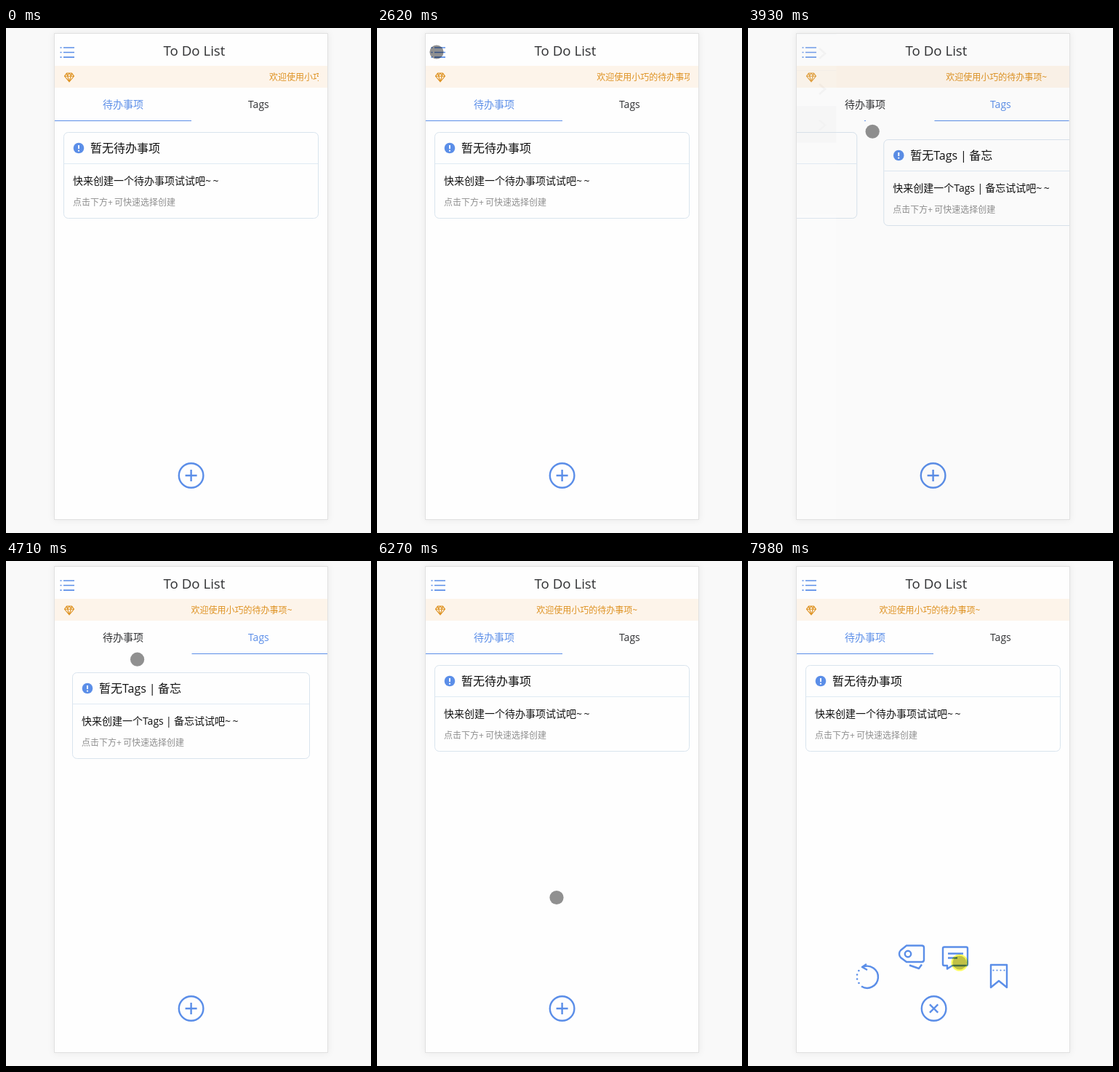
These frames come from a looping animation (502x694 px, 8000 ms). An HTML page:

```html
<!DOCTYPE html>
<html lang="zh">
<head>
<meta charset="utf-8">
<title>To Do List</title>
<style>
html, body { margin: 0; width: 100%; height: 100%; overflow: hidden; background: #f9f9f9; }
svg { display: block; width: 502px; height: 694px; }
text { font-family: "Open Sans", "Noto Sans CJK SC", "Noto Sans CJK", sans-serif; fill: #303133; white-space: pre; }
.line { fill: none; stroke: #5b8ee8; stroke-width: 2.4; stroke-linejoin: round; }
.dots { fill: none; stroke: #5b8ee8; stroke-linecap: round; }
.chev { fill: none; stroke: #c6c6c6; stroke-width: 2.6; }
</style>
</head>
<body>
<svg id="stage" viewBox="0 0 502 694"></svg>
<script>
const LOOP = 8000, STEP = 77.5, PHASE = 54;
const BLUE = '#5b8ee8', INK = '#303133';

// Symbols get the wider or narrower spacing of the CJK face.
const text = (x, y, size, s, fill = INK, id = '') =>
  `<text x="${x}" y="${y}" font-size="${size}" style="fill:${fill}" ${id && `id="${id}"`}>` +
  s.replace(/[~+]+/g, '<tspan letter-spacing=".18em">$&</tspan>')
   .replace(' | ', '<tspan letter-spacing="-.02em"> | </tspan>') + '</text>';

const card = (x, y, w, title, line) => `<g transform="translate(${x} ${y})">
  <rect x=".5" y=".5" width="${w - 1}" height="118" rx="6" fill="#fefefe" stroke="#d9e4ee"/>
  <path d="M1 43.5H${w - 1}" stroke="#dfeaf4"/>
  <circle cx="21" cy="22" r="7.3" fill="${BLUE}"/>
  <path d="M21 18V23" stroke="#fff" stroke-width="2"/><circle cx="21" cy="25.7" r="1.1" fill="#fff"/>
  ${text(37, 28, 16, title, '#111')}
  ${text(13, 72, 14, line, '#111')}
  ${text(13, 101, 12, '点击下方+可快速选择创建', '#909090')}</g>`;

const chevron = y => `<path class="chev" d="M273.5 ${y - 7}l8 7l-8 7"/>`;

// Menu buttons, drawn around their own centres, right to left.
const buttons = [
  { x: 345, y: 571, art: `<path class="line" d="M-11-16H11V15L0 6L-11 15Z"/>
      <path class="dots" stroke-width="2.2" stroke-dasharray="0 5" d="M-7.5-8.5H8"/>` },
  { x: 285, y: 545, art: `<path class="line" d="M-15-14.5H15Q17-14.5 17-12.5V9Q17 11 15 11H-4L-11 15.5V11H-15Q-17 11-17 9V-12.5Q-17-14.5-15-14.5Z"/>
      <path class="line" d="M-10-5.5H11M-10 .5H3"/>` },
  { x: 225, y: 544, art: `<path class="line" d="M-7-15.5H14Q17-15.5 17-12.5V4Q17 7 14 7H-7L-15 1Q-17-1-17-4Q-17-7-15-9Z"/>
      <circle class="line" cx="-5" cy="-4" r="4.2"/><path class="line" d="M-3 11.5L10 16L14 10.5"/>` },
  { x: 165, y: 571, art: `<path class="line" d="M-7-13A15 15 0 1 1-9 13.5"/>
      <path class="line" d="M-2-17L-8-13L-1-9"/>
      <path class="dots" stroke-width="2.6" stroke-dasharray="0 6" d="M-12.5 9A15 15 0 0 1-10-11"/>` }
];

const stage = document.getElementById('stage');
stage.innerHTML = `
<clipPath id="phone"><rect x="67" y="8" width="375" height="667"/></clipPath>
<clipPath id="strip"><rect x="104" y="52" width="326" height="30"/></clipPath>
<rect width="502" height="694" fill="#f9f9f9"/>
<rect x="66.5" y="7.5" width="376" height="668" fill="#fefefe" stroke="#e1e1e1"
  style="filter:drop-shadow(0 0 5px rgba(0,0,0,.07))"/>
<g clip-path="url(#phone)">
  <path d="M79 27H94M79 33.5H94M79 40.2H94" stroke="${BLUE}" stroke-width="1.7"/>
  <path d="M74.5 27H76.5M74.5 33.5H76.5M74.5 40.2H76.5" stroke="${BLUE}" stroke-width="1.7"/>
  ${text(216.5, 38, 18.7, 'To Do List')}
  <rect x="67" y="52" width="375" height="30" fill="#fdf4ea"/>
  <path d="M83.5 62H90.5L93.5 66.2L87 74L80.5 66.2ZM80.5 66.2H93.5M83.5 62L87 74L90.5 62M84.3 66L87 62L89.7 66"
    fill="none" stroke="#de9222" stroke-width="1.15" stroke-linejoin="round"/>
  <g clip-path="url(#strip)">${text(0, 72, 12, '欢迎使用小巧的待办事项~', '#de9222', 'news')}</g>
  ${text(133, 110, 14, '待办事项', BLUE, 'tab0')}
  ${text(333, 110, 14, 'Tags', INK, 'tab1')}
  <rect id="bar0" y="127" height="1" fill="${BLUE}"/>
  <rect id="bar1" y="127" height="1" fill="${BLUE}"/>
  <g id="pages">
    ${card(79, 143, 351, '暂无待办事项', '快来创建一个待办事项试试吧~~')}
    ${card(466, 153, 327, '暂无Tags | 备忘', '快来创建一个Tags | 备忘试试吧~~')}
  </g>
  ${buttons.map((b, i) => `<g id="btn${i}">${b.art}</g>`).join('')}
  <g id="add"><circle class="line" r="16.8"/><path class="line" d="M-8 0H8M0-8V8"/></g>
  <rect id="shade" x="67" y="8" width="375" height="667"/>
  <g id="drawer">
    <rect x="67" y="8" width="230" height="667" fill="#fff"/>
    <rect id="hover" x="67" y="108" width="230" height="49" fill="#e2e2e2"/>
    <path d="M67 8.5H297M79 58.5H297" stroke="#dbe8f2"/>
    <path d="M67 107.5H297M67 157.5H297" stroke="#e8ebee"/>
    ${chevron(35)}${chevron(84)}${chevron(133.5)}
    ${text(79, 90, 16, '全部待...')}
    ${text(79, 139, 16, '全部Tags')}
  </g>
</g>
<g id="cursor">
  <circle id="glow" r="11.5" fill="#ffff5c" style="mix-blend-mode:multiply"/>
  <circle id="dot" r="9.6"/>
</g>`;

const el = {};
stage.querySelectorAll('[id]').forEach(n => el[n.id] = n);
const set = (id, attrs) => { for (const k in attrs) el[id].setAttribute(k, attrs[k]); };

const span = (t, start, dur) => Math.min(1, Math.max(0, (t - start) / dur));
const sine = p => (1 - Math.cos(Math.PI * p)) / 2;
const out = p => 1 - (1 - p) ** 3;
const back = p => 1 + 2.7 * (p - 1) ** 3 + 1.7 * (p - 1) ** 2;

// Pointer stops: time, x, y
const path = [
  [905, 372, 653], [1000, 293, 445], [1150, 292, 337], [1300, 310, 290], [1480, 278, 262],
  [1690, 176, 125], [1850, 160, 110], [2420, 82, 33], [2700, 82, 33], [3165, 146, 147],
  [3640, 146, 146], [3930, 171, 142], [4220, 181, 157], [4500, 181, 155], [5020, 180, 106],
  [5500, 180, 106], [5940, 192, 130], [6120, 262, 357], [6220, 247, 430], [6300, 247, 495],
  [6400, 256, 624], [6600, 256, 624], [7045, 258, 622], [7200, 260, 618], [7600, 291, 552], [8000, 291, 552]
];
const clicks = [[2480, 2600], [3500, 3640], [5090, 5220], [6390, 6520], [7850, 8000]];

function pointer(t) {
  let i = 1;
  while (i < path.length - 1 && path[i][0] < t) i++;
  const [a, b] = [path[i - 1], path[i]], p = span(t, a[0], b[0] - a[0]);
  return [a[1] + (b[1] - a[1]) * p, a[2] + (b[2] - a[2]) * p];
}

function bar(id, mid, w) {
  set(id, { x: mid - w / 2, width: w });
}

function draw(t) {
  set('news', { x: 362 - t * 0.0228 });

  // Tabs and swiped pages
  const tags = out(span(t, 3700, 300)) - out(span(t, 5309, 300));
  const onTags = t >= 3700 && t < 5309;
  el.tab0.style.fill = onTags ? INK : BLUE;
  el.tab1.style.fill = onTags ? BLUE : INK;
  bar('bar0', 161, 188 * (1 - tags));
  bar('bar1', 349, 187 * tags);
  const swipe = sine(span(t, 3560, 565)) - sine(span(t, 5175, 565));
  set('pages', { transform: `translate(${-375 * swipe} 0)` });

  // Side drawer
  const open = sine(span(t, 2580, 350)) - sine(span(t, 3624, 460));
  set('drawer', { transform: `translate(${-230 * (1 - open)} 0)`, opacity: open ** 1.4 });
  set('shade', { opacity: 0.3 * open * open });
  set('hover', { opacity: t > 3500 ? 1 : 0 });

  // Fan menu
  buttons.forEach((b, i) => {
    const p = span(t, 6480 + 80 * i, 300), k = back(p);
    set('btn' + i, {
      transform: `translate(${255 + (b.x - 255) * k} ${615 + (b.y - 615) * k}) scale(${out(p)})`,
      opacity: p ? 1 : 0
    });
  });
  const turn = out(span(t, 6480, 300));
  set('add', { transform: `translate(${254.6 + turn} 615) rotate(${45 * turn})` });

  const [x, y] = pointer(t);
  const down = clicks.some(([a, b]) => t >= a && t < b);
  set('cursor', { transform: `translate(${x} ${y})`, visibility: t < 905 ? 'hidden' : 'visible' });
  set('glow', { opacity: down ? 1 : 0 });
  set('dot', { opacity: down ? 0.24 : 0.43 });
}

const begin = performance.now();
function tick() {
  const t = (performance.now() - begin) % LOOP;
  const n = Math.floor((t - PHASE) / STEP);
  draw(n < 0 ? 0 : PHASE + 6 + n * STEP);
  requestAnimationFrame(tick);
}
tick();
</script>
</body>
</html>
```
